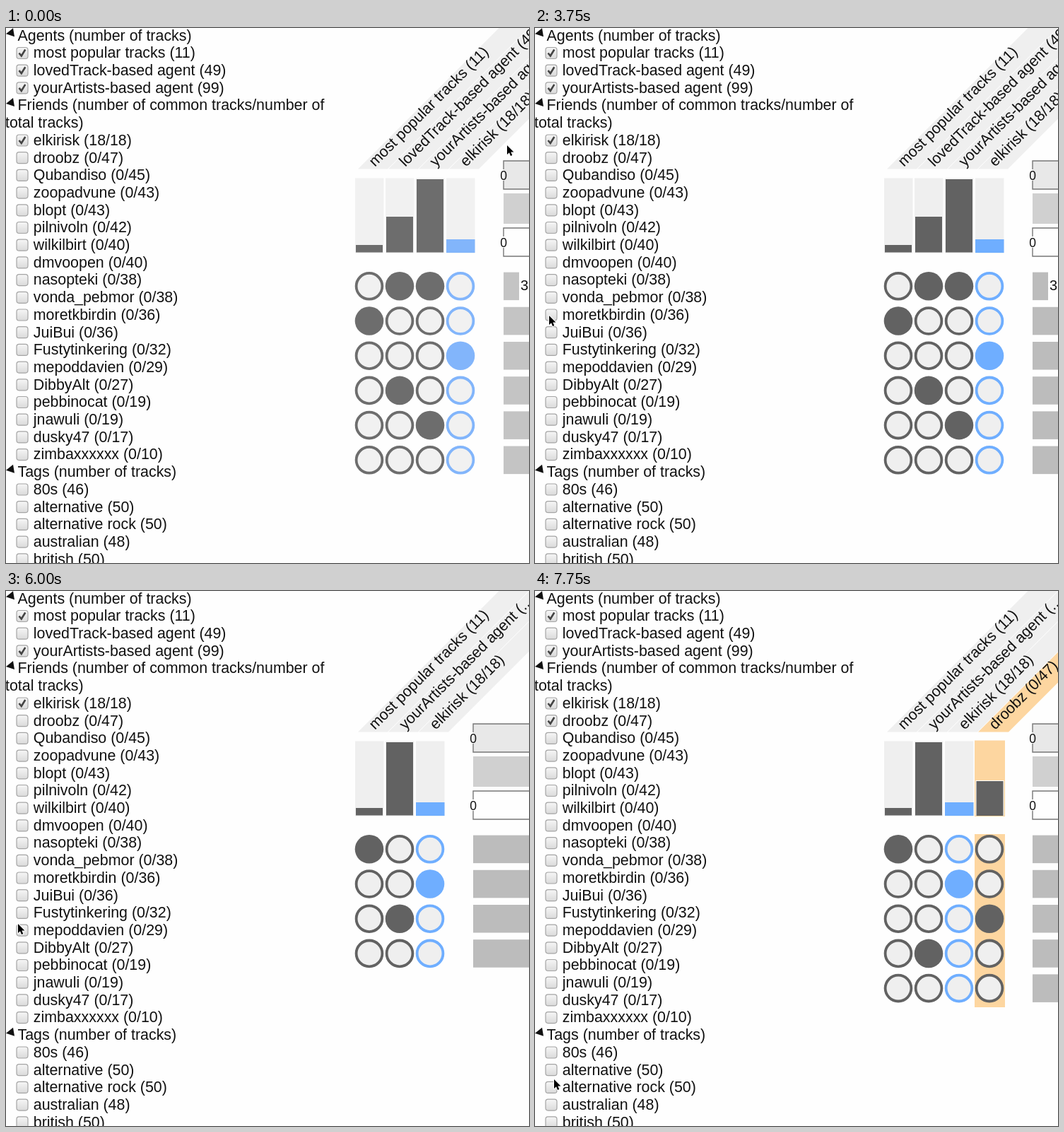
An HTML page with a canvas for the animation above (8 s loop, 740x757 px).

```html
<!DOCTYPE html>
<html lang="en">
<head>
<meta charset="utf-8">
<title>Agents, friends and tags</title>
<style>
html, body { margin: 0; width: 740px; height: 757px; overflow: hidden; background: #fefefe; }
canvas { display: block; }
</style>
</head>
<body>
<canvas id="stage" width="740" height="757"></canvas>
<script>
const ctx = document.getElementById('stage').getContext('2d');
const LOOP = 8000, STEP = 250;
const FONT = '"Liberation Sans", Arial, sans-serif';
const COL = 43, ROW = 49.2, LINE = 24.7, TOP = 365.3;
const ORANGE = '#fdd6a0';

const POPULAR = 'most popular tracks (11)';
const LOVED = 'lovedTrack-based agent (49)';
const ARTISTS = 'yourArtists-based agent (99)';
const FRIEND = 'elkirisk (18/18)';
const ADDED = 'droobz (0/47)';

// Lines starting with '#' are headings, with '-' plain continuation.
const LIST = [
  '#Agents (number of tracks)', POPULAR, LOVED, ARTISTS,
  '#Friends (number of common tracks/number of', '-total tracks)',
  FRIEND, ADDED, 'Qubandiso (0/45)', 'zoopadvune (0/43)', 'blopt (0/43)',
  'pilnivoln (0/42)', 'wilkilbirt (0/40)', 'dmvoopen (0/40)', 'nasopteki (0/38)',
  'vonda_pebmor (0/38)', 'moretkbirdin (0/36)', 'JuiBui (0/36)',
  'Fustytinkering (0/32)', 'mepoddavien (0/29)', 'DibbyAlt (0/27)',
  'pebbinocat (0/19)', 'jnawuli (0/19)', 'dusky47 (0/17)', 'zimbaxxxxxx (0/10)',
  '#Tags (number of tracks)', '80s (46)', 'alternative (50)',
  'alternative rock (50)', 'australian (48)', 'british (50)'
];

const popular = { label: POPULAR, top: 307 };
const loved = { label: LOVED, top: 267 };
const artists = { label: ARTISTS, top: 214 };
const artistsCut = { label: 'yourArtists-based agent (...', top: 214 };
const friend = { label: FRIEND, top: 299, blue: true };
const added = { label: ADDED, top: 269, fresh: true };

// Rows: filled columns, slot before, slot after.
const SCENES = [
  { from: 0, cols: [popular, loved, artists, friend], clip: 757, begin: 0,
    rows: [['0110', 0, 0], ['1000', 1, 1], ['0001', 2, 2], ['0100', 3, 3], ['0010', 4, 4], ['0000', 5, 5]] },
  { from: 4000, cols: [popular, artistsCut, friend], clip: 540, begin: 3843,
    rows: [['100', 3, 0], ['001', 2, 1], ['010', 4, 2], ['000', 5, 3]] },
  { from: 6500, cols: [popular, artistsCut, friend, added], clip: 589, begin: 6375,
    rows: [['0001', 1, 2], ['0010', 2, 1], ['0100', 0, 3], ['0000', 3, 4], ['1000', 0, 0, 7250]] }
];

const POINTER = [
  [0, 709, 166], [1250, 692, 169], [1500, 186, 293], [1750, 22, 390], [2000, 5, 414],
  [2250, 24, 409], [2500, 25, 408], [3500, 20, 408], [3750, 20, 407], [5250, 20, 410],
  [5500, 21, 419], [5750, 16, 462], [6000, 17, 471], [6500, 17, 480], [7000, 17, 492],
  [7250, 16, 583], [7500, 22, 630], [7750, 27, 691]
];

const cubic = u => u < 0 ? 0 : u > 1 ? 1 : u < .5 ? 4 * u ** 3 : 1 - 4 * (1 - u) ** 3;
const at = (list, t, key) => list.filter(e => e[key] <= t).pop();

function rect(x, y, w, h, fill) {
  ctx.fillStyle = fill;
  ctx.fillRect(x, y, w, h);
}

function text(s, x, y, size = 21.4) {
  ctx.font = size + 'px ' + FONT;
  ctx.fillStyle = '#111';
  ctx.fillText(s, x, y);
}

function poly(points, fill) {
  ctx.beginPath();
  points.forEach(([x, y]) => ctx.lineTo(x, y));
  ctx.closePath();
  ctx.fillStyle = fill;
  ctx.fill();
}

function checkbox(y, on) {
  const g = ctx.createLinearGradient(0, y - 8, 0, y + 8);
  g.addColorStop(0, '#f6f6f6');
  g.addColorStop(1, '#dadada');
  ctx.beginPath();
  ctx.roundRect(15, y - 8, 16, 16, 3.5);
  ctx.fillStyle = g;
  ctx.fill();
  ctx.strokeStyle = '#a4a4a4';
  ctx.lineWidth = 1.2;
  ctx.stroke();
  if (!on) return;
  ctx.beginPath();
  ctx.moveTo(18.5, y);
  ctx.lineTo(21.8, y + 4);
  ctx.lineTo(27.3, y - 5);
  ctx.strokeStyle = '#444';
  ctx.lineWidth = 2.6;
  ctx.stroke();
}

function drawList(t) {
  LIST.forEach((s, i) => {
    const mid = 10.8 + LINE * i, base = mid + 6.8;
    if (s[0] === '#') {
      poly([[10, mid - 10.5], [12, mid + 1.5], [0, mid - 2.5]], '#111');
      text(s.slice(1), 16.5, base);
    } else if (s[0] === '-') {
      text(s.slice(1), -1, base);
    } else {
      const on = s === POPULAR || s === ARTISTS || s === FRIEND ||
        (s === LOVED && t < 4000) || (s === ADDED && t >= 6500);
      checkbox(mid, on);
      text(s, 38.8, base);
    }
  });
}

function drawHeader(cols) {
  cols.forEach((c, i) => {
    const x = 498 + COL * i, w = c.fresh ? COL : COL - 1;
    poly([[x, 199.5], [x + w, 199.5], [x + w + 250, -50.5], [x + 250, -50.5]], c.fresh ? ORANGE : '#efefef');
  });
  cols.forEach((c, i) => {
    ctx.save();
    ctx.translate(522 + COL * i, 197);
    ctx.rotate(-Math.PI / 4);
    text(c.label, 0, 0);
    ctx.restore();
  });
}

function drawBars(cols, t, tone) {
  cols.forEach((c, i) => {
    const x = 494 + COL * i;
    if (c.fresh) {
      ctx.globalAlpha = t < 7000 ? 0 : t < 7250 ? .72 : 1;
      rect(x - 1, 211.5, 43, 107.5, ORANGE);
      rect(x + .5, c.top - 1, 40, 319 - c.top, '#fff');
      rect(x + 1.5, c.top, 38, 318 - c.top, tone.dark);
      ctx.globalAlpha = 1;
    } else {
      rect(x, 212.5, 40.5, 106, tone.light);
      if (c.blue) rect(x, c.top, 40.5, 318 - c.top, tone.blue);
      else rect(x + 1, c.top, 38, 317.5 - c.top, tone.dark);
    }
  });
}

function axis(x, y, fill) {
  rect(x, y, 100, 40, fill);
  ctx.beginPath();
  ctx.moveTo(800, y);
  ctx.lineTo(x, y);
  ctx.lineTo(x, y + 12);
  ctx.moveTo(x, y + 28);
  ctx.lineTo(x, y + 40);
  ctx.lineTo(800, y + 40);
  ctx.strokeStyle = '#777';
  ctx.lineWidth = 1.4;
  ctx.stroke();
  ctx.textAlign = 'center';
  text('0', x, y + 26.5, 17.5);
  ctx.textAlign = 'left';
}

function circle(x, y, full, ring, light) {
  ctx.beginPath();
  ctx.arc(x, y, full ? 20.3 : 18.4, 0, 2 * Math.PI);
  ctx.fillStyle = full ? ring : light;
  ctx.fill();
  if (full) return;
  ctx.strokeStyle = ring;
  ctx.lineWidth = 3.8;
  ctx.stroke();
}

function drawRows(scene, t, tone, x0) {
  const p = cubic((t - scene.begin) / 1000);
  ctx.save();
  ctx.beginPath();
  ctx.rect(0, 0, 740, scene.clip);
  ctx.clip();
  scene.cols.forEach((c, i) => {
    if (c.fresh) rect(493 + COL * i, 344, 43, 245, ORANGE);
  });
  scene.rows.forEach(([bits, a, b, since = 0]) => {
    if (t < since) return;
    const y = TOP + ROW * (a + (b - a) * p);
    const short = bits === '0110';
    rect(x0, y - 19.7, short ? 22 : 100, 39.5, tone.bar);
    if (short) text('3', 728, y + 5.5, 20);
    scene.cols.forEach((c, i) =>
      circle(514 + COL * i, y, bits[i] === '1', c.blue ? tone.blue : tone.dark, tone.light));
  });
  ctx.restore();
}

function drawPointer(x, y) {
  ctx.save();
  ctx.translate(x, y);
  ctx.beginPath();
  [[0, 0], [0, 13], [3, 10.3], [5, 15], [7.3, 14], [5.3, 9.5], [9.5, 9.5]].forEach(([a, b]) => ctx.lineTo(a, b));
  ctx.closePath();
  ctx.lineJoin = 'round';
  ctx.strokeStyle = '#fff';
  ctx.lineWidth = 2;
  ctx.stroke();
  ctx.fillStyle = '#000';
  ctx.fill();
  ctx.restore();
}

function draw(t) {
  const tone = t < 250
    ? { dark: '#6d6d6d', blue: '#82b5fb', light: '#f1f1f1', bar: '#c4c4c4' }
    : { dark: '#626262', blue: '#6faeff', light: '#efefef', bar: '#bcbcbc' };
  const scene = at(SCENES, t, 'from');
  const x0 = 532 + COL * scene.cols.length;
  rect(0, 0, 740, 757, '#fefefe');
  drawList(t);
  drawHeader(scene.cols);
  drawBars(scene.cols, t, tone);
  axis(x0, 188, '#e8e8e8');
  rect(x0, 234, 100, 43, '#d0d0d0');
  axis(x0, 283, '#fefefe');
  drawRows(scene, t, tone, x0);
  const [, x, y] = at(POINTER, t, 0);
  drawPointer(x, y);
}

const start = performance.now();
function tick() {
  const t = Math.max(0, performance.now() - start) % LOOP;
  draw(Math.floor(t / STEP) * STEP);
  requestAnimationFrame(tick);
}
tick();
</script>
</body>
</html>
```
